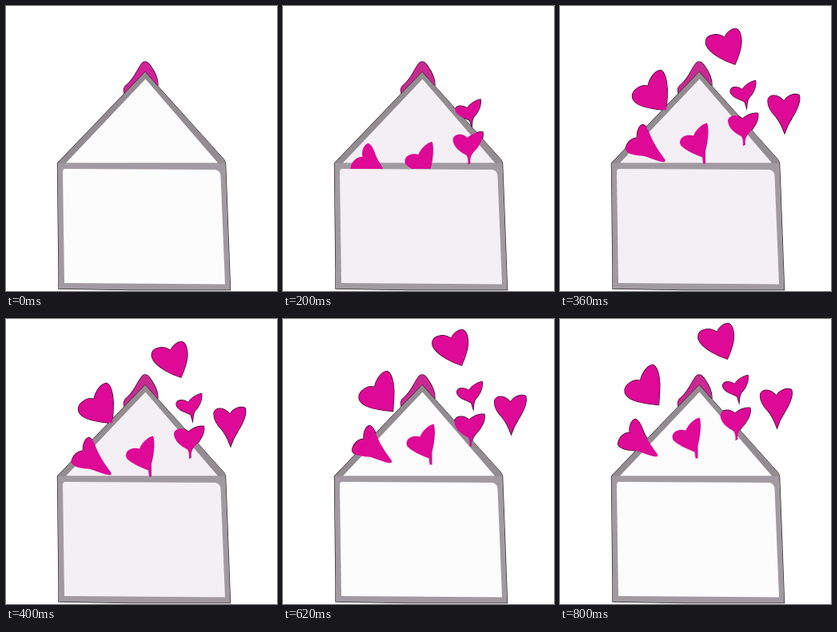
These frames come from a looping animation (339x357 px, 900 ms). An HTML page with a canvas:

```html
<!DOCTYPE html>
<html lang="en">
<head>
<meta charset="utf-8">
<title>Envelope with hearts</title>
<style>
html, body { margin: 0; width: 100%; height: 100%; overflow: hidden; background: #fff; }
canvas { display: block; width: 339px; height: 357px; }
</style>
</head>
<body>
<canvas id="stage"></canvas>
<script>
const W = 339, H = 357, LOOP = 900;
const GREY = '#a29aa1', FLAP_GREY = '#938c91', EDGE = '#2c282b', PINK = '#de0996', RIM = '#3a0a2a';
const canvas = document.getElementById('stage');
const ratio = window.devicePixelRatio || 1;
canvas.width = Math.round(W * ratio);
canvas.height = Math.round(H * ratio);
const ctx = canvas.getContext('2d');

const outline = new Path2D('M174 83L273 193L274.5 197L276 235L280.5 355.5L155 355.5L66 354L66 330L64.5 197Z');
const flapEdge = new Path2D('M174 83L273 193L274 197L65 197Z');
const flap = new Path2D('M174.5 91.5L265 196.5L75 196.5Z');
const pocket = new Path2D('M74 204L262 205Q268 206 268.5 213L274 348.5L73 347L71 208Q71 204 74 204Z');
const backHeart = new Path2D('M148 109C146 104 149 100 153 97C162 89 165 77 171 71C174 69 177 70 180 74C185 81 190.5 91 190 99L174 96Z');

// The first four hearts come out before the others.
const hearts = [
  'M130 195C120 194 110 188 102 187C95 187 83 185 82 179C83 171 90 164 97 165C95 158 99 149 104 148C110 150 112 160 115 166C119 174 124 182 131.5 192Q132 195 130 195Z',
  'M179 197L178 189C170 186 156 180 151 174C147 166 156 159 167 162C170 154 178 147 184 146C187 153 185 170 182 181L182 197Z',
  'M229 175C229 170 229 166 227 163C219 159 210 152 210 143C211 136 222 134 228 141C233 137 241 133 247.5 134C249 143 242 153 237 158C233 162 231 167 232 173Z',
  'M233.5 127L231 119C225 116 214 114 213 106C214 100 222 100 228 104C231 99 238 94 244.5 93C246 101 241 110 236 115C234 118 234 122 233.5 127Z',
  'M133 130C122 129 104 127 97 122C88 116 89 108 96 103C100 100 105 98 110 100C112 90 119 80 126 80C134 84 135 104 134 115Z',
  'M219 72.5C206 69 191 60 185 52C180 45 182 38 190 36C197 34 203 37 206 39C208 33 214 28 220 28C228 31 228 46 225 56C223 63 221 68 219 72.5Z',
  'M281 159C278 151 275 144 270 138C265 133 260 126 260 118C260 111 272 108 280 119C284 112 293 108 299 111C302 119 295 132 290 140C286 146 283 152 281 159Z'
].map(d => new Path2D(d));

// Poses held until the next start time.
const poses = [
  { at: 0, count: 0, x: 0, y: 0, paper: '#fcfcfc' },
  { at: 200, count: 4, x: 2.5, y: 24, paper: '#f4eff4' },
  { at: 300, count: 7, x: 0, y: 0.5, paper: '#f4eff4' },
  { at: 500, count: 7, x: 4.5, y: -14.5, paper: '#fcfcfc' },
  { at: 700, count: 7, x: -9.5, y: -22.5, paper: '#fcfcfc' }
];

function fill(path, color) {
  ctx.fillStyle = color;
  ctx.fill(path);
}

function stroke(path, color, width) {
  ctx.strokeStyle = color;
  ctx.lineWidth = width;
  ctx.stroke(path);
}

function drawHearts(pose) {
  ctx.save();
  ctx.beginPath();
  ctx.rect(0, 0, W, 204);
  ctx.clip();
  const outside = new Path2D();
  outside.rect(0, 0, W, H);
  outside.addPath(outline);
  for (const heart of hearts.slice(0, pose.count)) {
    const placed = new Path2D();
    placed.addPath(heart, new DOMMatrix([1, 0, 0, 1, pose.x, pose.y]));
    ctx.save();
    ctx.clip(outside, 'evenodd');
    stroke(placed, RIM, 1.4);
    ctx.restore();
    fill(placed, PINK);
  }
  ctx.restore();
}

function draw(now) {
  const t = now % LOOP;
  const pose = poses.filter(p => p.at <= t).pop();
  ctx.setTransform(ratio, 0, 0, ratio, 0, 0);
  ctx.fillStyle = '#fff';
  ctx.fillRect(0, 0, W, H);
  stroke(backHeart, RIM, 1.4);
  fill(backHeart, pose.count ? '#c92a92' : '#d3219a');
  stroke(outline, EDGE, 1.4);
  fill(outline, GREY);
  fill(flapEdge, FLAP_GREY);
  fill(flap, pose.paper);
  fill(pocket, pose.paper);
  drawHearts(pose);
}

const start = performance.now();
function tick() {
  draw(performance.now() - start);
  requestAnimationFrame(tick);
}
tick();
</script>
</body>
</html>
```
